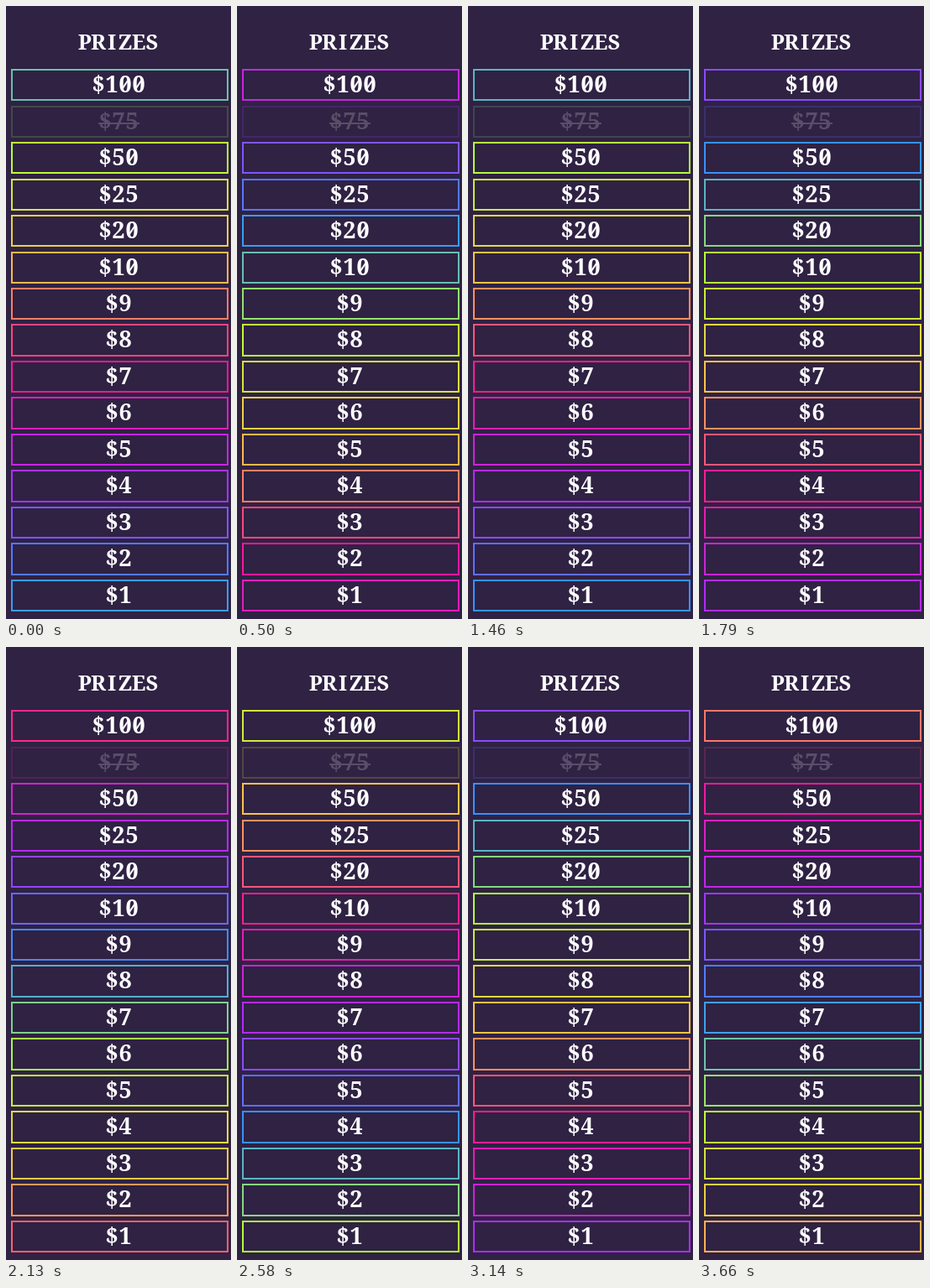
An HTML page for the animation above (3760 ms loop, 268x731 px).

```html
<!DOCTYPE html>
<html lang="en">
<head>
<meta charset="utf-8">
<title>Prizes</title>
<style>
  html, body { margin: 0; width: 100%; height: 100%; overflow: hidden; background: #2f2243; }
  svg { display: block; }
  text { font: 700 27px "Noto Serif", serif; text-anchor: middle; fill: #fff; }
  .title { font-size: 25.5px; }
  rect { fill: none; stroke-width: 2; shape-rendering: crispEdges; }
  line { stroke: #fff; stroke-width: 2; }
  .gone { opacity: .2; }
</style>
</head>
<body>
<svg width="268" height="731"></svg>
<script>
const LOOP = 3760;
const CENTER = 134, CELL = 16;
const ROW_TOP = 75.1, ROW_STEP = 43.48, ROW_HEIGHT = 38.3;
const MS_PER_ROW = 1400 / 15;
const STOPS = [          // lime, gold, pink, purple, azure
  [185, 255, 51], [255, 194, 71], [255, 22, 149], [177, 43, 255], [50, 150, 255]
];
const ROWS_PER_STOP = 3, FIRST_STOP = 1.8;
const prizes = [100, 75, 50, 25, 20, 10, 9, 8, 7, 6, 5, 4, 3, 2, 1];
const svg = document.querySelector('svg');

function add(parent, name, attributes, content = '') {
  const node = document.createElementNS('http://www.w3.org/2000/svg', name);
  for (const key in attributes) node.setAttribute(key, attributes[key]);
  node.textContent = content;
  return parent.appendChild(node);
}

// Centres every character in a fixed-width cell and slashes the zeros.
function label(parent, content, baseline, className = '') {
  const first = CENTER - CELL * (content.length - 1) / 2;
  const centers = [...content].map((_, i) => first + CELL * i);
  add(parent, 'text', { x: centers.join(' '), y: baseline, class: className }, content);
  centers.forEach((x, i) => {
    if (content[i] === '0') {
      add(parent, 'line', { x1: x - 3, y1: baseline - 5, x2: x + 3, y2: baseline - 14 });
    }
  });
}

label(svg, 'PRIZES', 52, 'title');

const boxes = prizes.map((prize, row) => {
  const gone = prize === 75;
  const group = add(svg, 'g', { class: gone ? 'gone' : '' });
  const exactTop = ROW_TOP + ROW_STEP * row;
  const top = Math.round(exactTop);
  const bottom = Math.round(exactTop + ROW_HEIGHT);
  const box = add(group, 'rect', { x: 7, y: top + 1, width: 257, height: bottom - top - 2 });
  label(group, '$' + prize, top + 28);
  if (gone) add(group, 'line', { x1: 110, y1: top + 21, x2: 159, y2: top + 21 });
  return box;
});

// Moments at which the colours advance, including a short hold near the end.
const ticks = [0];
for (let i = 0; i < 9; i++) ticks.push(80 + 60 * i);
for (let i = 0; i < 50; i++) ticks.push(Math.floor((622 + 56.1 * i) / 10) * 10);
ticks.push(3430, 3570, 3620, 3660);

function colorAt(position) {
  const count = STOPS.length;
  const p = (((position - FIRST_STOP) / ROWS_PER_STOP) % count + count) % count;
  const index = Math.floor(p) % count;
  const next = STOPS[(index + 1) % count];
  const mixed = STOPS[index].map((c, i) => Math.round(c + (next[i] - c) * (p - Math.floor(p))));
  return `rgb(${mixed})`;
}

function draw(now) {
  const time = now % LOOP;
  const tick = ticks.findLast(t => t <= time) ?? 0;
  const shift = Math.max(0, tick - 30) / MS_PER_ROW;
  boxes.forEach((box, row) => box.setAttribute('stroke', colorAt(row - shift)));
}

const start = performance.now();
function frame() {
  draw(performance.now() - start);
  requestAnimationFrame(frame);
}
frame();
</script>
</body>
</html>
```
